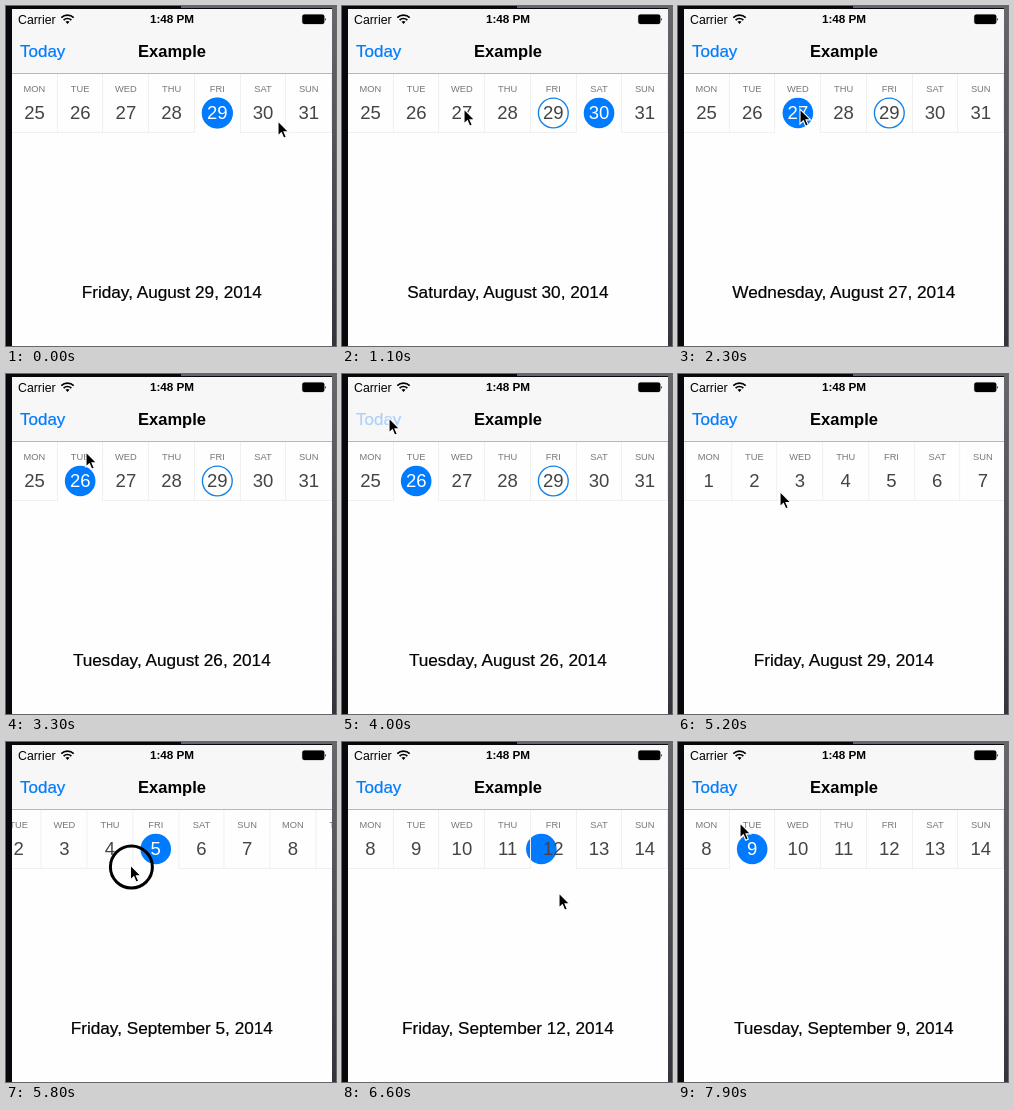
An HTML page that plays this animation: 330 by 340 pixels, repeating every 8 s.

```html
<!DOCTYPE html>
<html lang="en">
<head>
<meta charset="utf-8">
<title>Week calendar</title>
<style>
  html, body { margin: 0; width: 100%; height: 100%; overflow: hidden; background: #fff; }
  svg { display: block; font: 17px "Liberation Sans", Arial, sans-serif; }
  .mid { text-anchor: middle; }
  .day { font-size: 9.3px; fill: #777; }
  .num { font-size: 18.5px; fill: #444; }
  .num.on { fill: #fff; }
  .line { fill: #f0f0f0; }
  #label { font-size: 17.2px; stroke: #000; stroke-width: .2; }
  #today { fill: #007aff; stroke: #007aff; stroke-width: .2; }
</style>
</head>
<body>
<svg width="330" height="340" viewBox="0 0 330 340">
  <defs>
    <clipPath id="screen"><rect x="6" y="68" width="320" height="60"/></clipPath>
    <linearGradient id="edge" x2="0" y2="1">
      <stop stop-color="#66666c"/><stop offset="1" stop-color="#34343c"/>
    </linearGradient>
  </defs>
  <rect width="330" height="340" fill="#08080c"/>
  <rect x="175" width="155" height="2" fill="#66666c"/>
  <rect x="326" width="4" height="340" fill="url(#edge)"/>
  <rect x="6" y="3" width="320" height="337" fill="#fefefe"/>
  <rect x="6" y="3" width="320" height="64" fill="#f7f7f7"/>
  <rect x="6" y="67" width="320" height="1" fill="#b8b8b8"/>

  <text x="12" y="17.5" font-size="12.3">Carrier</text>
  <g fill="none" stroke="#000" stroke-width="1.7">
    <path d="M55.3 11.7a9 9 0 0 1 12.4 0M57.6 14.1a5.6 5.6 0 0 1 7.8 0"/>
    <path d="M61.5 18l-2-2.2a3 3 0 0 1 4 0z" fill="#000" stroke="none"/>
  </g>
  <text class="mid" x="166" y="17" font-size="11.7" font-weight="700">1:48 PM</text>
  <rect x="296.3" y="8.5" width="22" height="9.5" rx="2" stroke="#000" stroke-opacity=".4" stroke-width=".6"/>
  <path d="M319 11.7q1.7 1.6 0 3.2z"/>

  <text id="today" x="14" y="51">Today</text>
  <text class="mid" x="166" y="51" font-size="16.5" font-weight="700">Example</text>

  <g clip-path="url(#screen)">
    <g id="strip">
      <g id="marks"></g>
      <circle id="dot" cy="107" r="15.3" fill="#007aff"/>
      <g id="cells"></g>
    </g>
  </g>
  <text id="label" class="mid" x="165.8" y="292"></text>

  <circle id="touch" r="21" fill="none" stroke="#000" stroke-width="3"/>
  <path id="cursor" d="M0 0V15L3.4 11.8 5.7 17.2 8.3 16.1 6 10.9H10.7Z" stroke="#fff" stroke-width="1.1"/>
</svg>
<script>
const LOOP = 8000, WEEK = 320, CELL = WEEK / 7, SLIDE = 300, DAYS = 22, TODAY = 4;
const $ = id => document.getElementById(id);
const centre = i => 5.6 + CELL * (i + 0.5);
const dateOf = i => new Date(2014, 7, 25 + i);
const progress = (t, a, b) => Math.min(1, Math.max(0, (t - a) / (b - a)));
const easeOut = u => 1 - (1 - u) ** 2;
const easeInOut = u => u < 0.5 ? 2 * u * u : 1 - 2 * (1 - u) ** 2;

// [time, selected day], days counted from Monday, August 25
const picks = [[-SLIDE, 4], [260, 5], [1560, 2], [2860, 1], [4060, 4], [5242, 11], [6342, 18], [7360, 15]];
// week swipes: [start, end]
const swipes = [[4740, 5242], [5740, 6342]];
// pointer moves: [start, end, x, y]
const moves = [
  [0, 1, 272, 115], [600, 1100, 122, 103], [2300, 2700, 80, 78], [3300, 3700, 47, 44],
  [4200, 4600, 191, 110], [4740, 4870, 60, 115], [5000, 5500, 190, 123], [5740, 5860, 63, 123],
  [6000, 6600, 217, 151], [6600, 7000, 66, 96], [7820, 7890, 62, 81]
];

function add(parent, tag, attrs, text = "") {
  const el = document.createElementNS("http://www.w3.org/2000/svg", tag);
  for (const key in attrs) el.setAttribute(key, attrs[key]);
  el.textContent = text;
  return parent.appendChild(el);
}

add($("marks"), "circle", {
  cx: centre(TODAY), cy: 107, r: 14.9, fill: "none", stroke: "#1684e6", "stroke-width": 1.4
});

const cells = Array.from({ length: DAYS }, (_, i) => {
  const x = centre(i), date = dateOf(i), g = $("cells");
  const name = date.toLocaleDateString("en-US", { weekday: "short" }).toUpperCase();
  add(g, "rect", { class: "line", x: Math.round(6 + CELL * (i + 1)) - 1, y: 68, width: 1, height: 59 });
  const base = add(g, "rect", { class: "line", x: 6 + CELL * i, y: 126, width: CELL, height: 1 });
  add(g, "text", { class: "mid day", x, y: 85.6 }, name);
  const num = add(g, "text", { class: "mid num", x, y: 113.3 }, date.getDate());
  return { base, num };
});

// Each move blends the pointer from wherever the earlier ones left it.
function pointer(t) {
  let [, , x, y] = moves[0];
  for (const [a, b, toX, toY] of moves) {
    const u = easeInOut(progress(t, a, b));
    x += (toX - x) * u;
    y += (toY - y) * u;
  }
  return [x, y];
}

function draw(t) {
  const now = picks.findLastIndex(p => p[0] <= t);
  const [start, day] = picks[now];
  const from = now ? picks[now - 1][1] : day;
  const u = progress(t, start, start + SLIDE);
  $("dot").setAttribute("cx", centre(from + (day - from) * easeInOut(u)));
  cells.forEach(({ base, num }, i) => {
    base.style.display = i === day ? "none" : "";
    num.classList.toggle("on", i === day && u === 1);
  });
  $("label").textContent = dateOf(day).toLocaleDateString("en-US",
    { weekday: "long", month: "long", day: "numeric", year: "numeric" });

  const shift = swipes.reduce((sum, [a, b]) => sum + WEEK * easeOut(progress(t, a, b)), 0);
  $("strip").setAttribute("transform", `translate(${-shift} 0)`);
  $("today").style.opacity = t > 3870 && t < 4060 ? 0.3 : 1;

  const [x, y] = pointer(t);
  $("cursor").setAttribute("transform", `translate(${x} ${y})`);
  $("touch").setAttribute("transform", `translate(${x + 1} ${y + 2})`);
  $("touch").style.display = swipes.some(([a]) => t > a - 45 && t < a + 150) ? "" : "none";
}

const begin = performance.now();
function tick() {
  draw((performance.now() - begin) % LOOP);
  requestAnimationFrame(tick);
}
tick();
</script>
</body>
</html>
```
